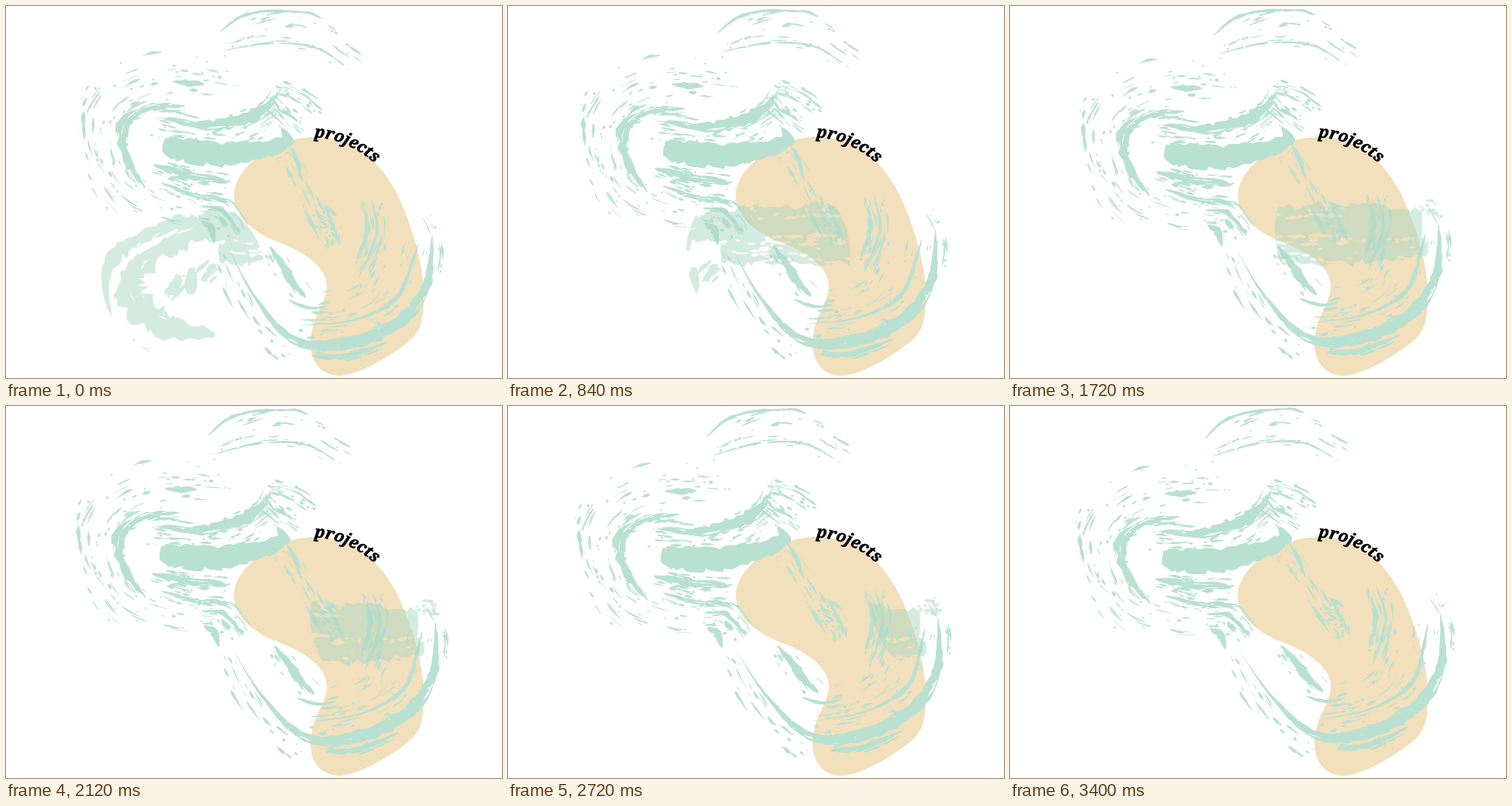
These frames come from a looping animation (640 by 480 pixels, 5.8 s). An HTML page with a canvas:

```html
<!DOCTYPE html>
<html lang="en">
<head>
<meta charset="utf-8">
<title>Projects</title>
<style>
  html, body { margin: 0; width: 100%; height: 100%; overflow: hidden; background: #fff; }
  canvas, svg { position: absolute; left: 0; top: 0; width: 640px; height: 480px; }
  text { font: italic 900 21px "Noto Serif", serif; stroke: #000; stroke-width: .6px; }
</style>
</head>
<body>
<canvas id="stage" width="640" height="480"></canvas>
<svg viewBox="0 0 640 480">
  <path id="curve" fill="none" d="M398,169.5 C425,170 462,184 490,218"/>
  <text><textPath href="#curve">projects</textPath></text>
</svg>
<script>
const LOOP = 5800, MOVE = 3400, STEP = 40;
const ctx = document.getElementById('stage').getContext('2d');

let seed = 11;
function rand() {
  seed = (seed + 0x6D2B79F5) | 0;
  let r = Math.imul(seed ^ (seed >>> 15), 1 | seed);
  r = (r + Math.imul(r ^ (r >>> 7), 61 | r)) ^ r;
  return ((r ^ (r >>> 14)) >>> 0) / 4294967296;
}

let pen; // context of the layer being painted
function layer(color, paint) {
  const canvas = document.createElement('canvas');
  canvas.width = 1280;
  canvas.height = 960;
  pen = canvas.getContext('2d');
  pen.scale(2, 2);
  pen.fillStyle = color;
  paint();
  return canvas;
}

function erase(paint) {
  pen.globalCompositeOperation = 'destination-out';
  paint();
  pen.globalCompositeOperation = 'source-over';
}

// Catmull-Rom spline through x,y pairs, sampled about every 2 px, with normals.
function trace(flat) {
  const last = flat.length / 2 - 1, line = [];
  const knot = (i, axis) => flat[2 * Math.max(0, Math.min(last, i)) + axis];
  const spline = (i, s, axis) => {
    const [a, b, c, d] = [-1, 0, 1, 2].map(k => knot(i + k, axis));
    return b + s / 2 * (c - a + s * (2 * a - 5 * b + 4 * c - d + s * (3 * (b - c) + d - a)));
  };
  for (let i = 0; i < last; i++) {
    const steps = Math.ceil(Math.hypot(knot(i + 1, 0) - knot(i, 0), knot(i + 1, 1) - knot(i, 1)) / 2);
    for (let k = 0; k < steps; k++) line.push({ x: spline(i, k / steps, 0), y: spline(i, k / steps, 1) });
  }
  line.push({ x: knot(last, 0), y: knot(last, 1) });
  line.forEach((p, i) => {
    const a = line[Math.max(0, i - 1)], b = line[Math.min(line.length - 1, i + 1)];
    const d = Math.hypot(b.x - a.x, b.y - a.y) || 1;
    p.nx = (a.y - b.y) / d;
    p.ny = (b.x - a.x) / d;
  });
  return line;
}

// Torn edge: straight runs of uneven length between random heights.
function tornEdge(count) {
  const edge = [];
  let from = rand() * 2 - 1;
  while (edge.length < count) {
    const to = rand() * 2 - 1, run = 1 + Math.floor(rand() * 5);
    for (let k = 0; k < run; k++) edge.push(from + (to - from) * k / run);
    from = to;
  }
  return edge;
}

// skew moves the widest place along the line; a low blunt squares off the ends.
function ribbon(line, offset, width, { skew = 1, blunt = 0.7, rough = 0.4 } = {}) {
  const side = sign => {
    const edge = tornEdge(line.length);
    return line.map((p, i) => {
      const swell = Math.max(0, Math.sin(Math.PI * (i / (line.length - 1)) ** skew)) ** blunt;
      const reach = offset + sign * width / 2 * swell * (1 + rough * edge[i]);
      return [p.x + p.nx * reach, p.y + p.ny * reach];
    });
  };
  pen.beginPath();
  [...side(1), ...side(-1).reverse()].forEach(([x, y]) => pen.lineTo(x, y));
  pen.fill();
}

// Broken bristle marks scattered along a line.
function bristles(line, spread, marks, length, width) {
  for (let i = 0; i < marks; i++) {
    const n = Math.max(3, Math.round(length * (0.3 + rand() ** 2 * 1.6) / 2));
    const from = Math.floor(rand() * Math.max(1, line.length - n));
    ribbon(line.slice(from, from + n), (rand() - 0.5) * spread, width * (0.4 + rand() * 1.2), { rough: 0.7 });
  }
}

// One dry brush stroke: a solid core, scratches in it, loose bristles around it.
function brush(points, { core = 0, scratches = 0, spread = 0, marks = 0, length = 17, width = 2.2, ...shape }) {
  const line = trace(points);
  if (core) ribbon(line, 0, core, shape);
  erase(() => bristles(line, core, scratches, 15, 1.6));
  bristles(line, spread, marks, length, width);
}

const mint = layer('#b9e1d2', () => {
  // crown
  brush([276, 33, 305, 13, 345, 6, 398, 10], { core: 4, skew: 0.8 });
  brush([280, 58, 340, 48, 400, 54, 446, 84], { core: 3, scratches: 14, spread: 20, marks: 18 });
  brush([285, 40, 345, 19, 400, 24, 467, 70], { spread: 24, marks: 24 });

  // spiral
  brush([300, 82, 250, 72, 180, 75, 120, 105, 99, 160, 125, 235, 167, 282], { spread: 28, marks: 48 });
  brush([300, 105, 230, 98, 165, 112, 128, 160, 145, 225, 205, 262, 285, 275], { spread: 30, marks: 64 });
  brush([215, 97, 236, 99, 257, 101], { core: 7 });
  brush([232, 129, 185, 131, 153, 155, 155, 195, 180, 236],
    { core: 12, scratches: 18, spread: 18, marks: 26 });
  brush([195, 143, 250, 154, 300, 148, 335, 132, 352, 110],
    { core: 16, skew: 1.4, blunt: 1, scratches: 12, spread: 24, marks: 40 });
  brush([182, 160, 240, 171, 300, 173, 355, 145], { spread: 18, marks: 36 });
  brush([190, 205, 235, 218, 290, 226], { core: 12, scratches: 12, spread: 20, marks: 34 });
  brush([200, 228, 240, 243, 290, 254], { core: 6, scratches: 8, spread: 24, marks: 36 });
  brush([202, 180, 240, 187, 290, 191, 340, 183, 370, 170], { core: 31, skew: 0.6, blunt: 0.35, rough: 0.2 });
  brush([355, 156, 368, 181], { core: 17, skew: 2 });
  brush([348, 103, 380, 115, 410, 138], { spread: 22, marks: 34 });
  brush([338, 118, 355, 135, 386, 162], { spread: 24, marks: 30 });

  // lower sweep
  brush([250, 258, 280, 265, 302, 295], { core: 5, spread: 36, marks: 34 });
  brush([252, 277, 265, 288, 269, 306], { core: 9 });
  brush([286, 309, 320, 374, 370, 430, 435, 436, 505, 409, 543, 360, 550, 294],
    { core: 17, skew: 1.5, blunt: 1, rough: 0.2, scratches: 14 });
  brush([375, 412, 450, 405, 505, 375, 532, 306], { core: 5, skew: 1.6, spread: 34, marks: 46 });
  brush([275, 315, 312, 397, 370, 458], { spread: 28, marks: 26 });
  brush([395, 452, 440, 451, 492, 434], { core: 7, skew: 0.7, spread: 14, marks: 16 });
  brush([556, 345, 558, 310, 540, 270], { spread: 16, marks: 12 });
  brush([340, 310, 365, 348, 387, 377], { core: 11, scratches: 4, spread: 28, marks: 18 });
  brush([364, 379, 388, 389, 414, 388], { core: 4 });

  // over the sand shape
  brush([366, 180, 375, 198, 383, 228], { core: 5 });
  brush([358, 190, 378, 219, 397, 258, 420, 305], { spread: 26, marks: 42 });
  brush([400, 265, 422, 285, 424, 316], { spread: 24, marks: 30, length: 12, width: 2.8 });
  brush([460, 250, 466, 290, 452, 328], { core: 6, scratches: 4 });
  brush([472, 250, 478, 295, 455, 350], { core: 4, spread: 32, marks: 32 });
  brush([490, 320, 460, 370, 400, 390], { spread: 40, marks: 26 });
});

const wash = layer('#aad8c4', () => {
  // open ring on the left, split by a pale groove
  brush([139, 415, 127, 365, 146, 317, 225, 276], { core: 17, blunt: 0.4 });
  brush([270, 424, 205, 412, 160, 372, 170, 330, 225, 292, 290, 280],
    { core: 42, skew: 1.4, blunt: 0.35, scratches: 14 });
  erase(() => brush([141, 418, 138, 368, 158, 325, 222, 288], { core: 9, blunt: 0.4, rough: 0.7 }));

  // two ragged bands
  brush([248, 284, 390, 280, 532, 282], { core: 46, blunt: 0.12, rough: 0.25 });
  brush([274, 317, 400, 317, 540, 311], { core: 33, blunt: 0.15, rough: 0.35 });
  erase(() => {
    pen.fillRect(247, 319, 28, 30);
    bristles(trace([305, 304, 420, 301, 540, 306]), 12, 34, 16, 4);
    bristles(trace([310, 266, 440, 262]), 18, 26, 14, 4);
    bristles(trace([285, 324, 400, 324, 530, 322]), 24, 44, 13, 3.4);
  });

  // crumbs
  brush([240, 337, 238, 372], { core: 13, blunt: 0.3 });
  brush([207, 376, 233, 346], { spread: 18, marks: 20, width: 5 });
  brush([250, 355, 272, 332], { spread: 22, marks: 16, width: 4 });
  brush([528, 262, 557, 258], { spread: 18, marks: 18, length: 9, width: 6 });
  brush([150, 430, 188, 444], { spread: 9, marks: 8, length: 8 });
});

const sand = new Path2D('M402,169 C455,170 490,208 510,254 C526,292 539,335 539,372 ' +
  'C539,405 536,420 518,434 C492,455 452,477 430,477 C408,477 393,460 393,437 ' +
  'C393,400 414,385 414,361 C414,335 380,315 350,304 C318,292 294,270 294,245 C294,210 345,168 402,169Z');

function draw() {
  const clock = performance.now() % LOOP;
  const t = Math.min(Math.floor(clock / STEP) * STEP, MOVE);
  ctx.clearRect(0, 0, 640, 480);
  ctx.fillStyle = '#f2dfbb';
  ctx.fill(sand);

  ctx.save();
  ctx.translate(335, 235);
  ctx.rotate(-0.125 * t / MOVE);
  ctx.drawImage(mint, -335, -235, 640, 480);
  ctx.restore();

  // a round window drifts across the still wash
  if (t < MOVE) {
    ctx.save();
    ctx.beginPath();
    ctx.arc(229 + 0.127 * t, 350 - 0.036 * t, 106, 0, 2 * Math.PI);
    ctx.clip();
    ctx.globalAlpha = 0.5;
    ctx.drawImage(wash, 0, 0, 640, 480);
    ctx.restore();
  }
  requestAnimationFrame(draw);
}
draw();
</script>
</body>
</html>
```
